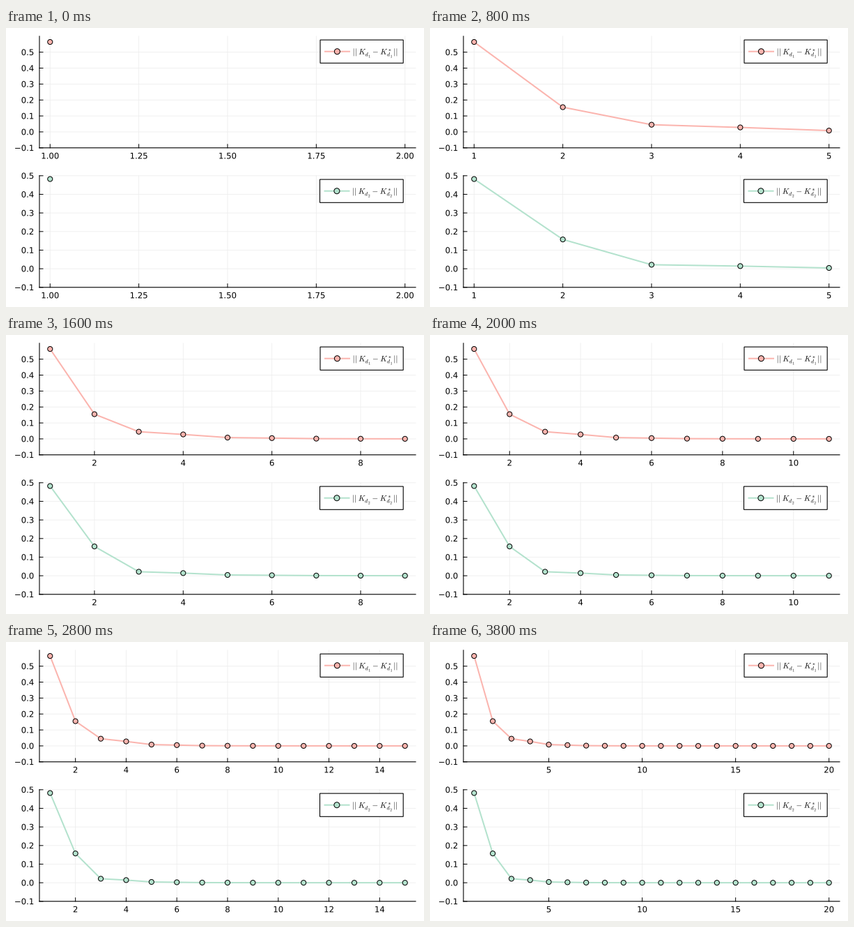
A matplotlib script that plays this animation: 600 by 400 pixels, repeating every 4000 ms.

```python
import numpy as np
import matplotlib.pyplot as plt
from matplotlib.animation import FuncAnimation
from matplotlib.patches import Circle, PathPatch, Rectangle
from matplotlib.textpath import TextPath
from matplotlib.transforms import Affine2D

plt.rcParams["mathtext.fontset"] = "cm"

W, H, DPI = 600, 400, 100
STEPS = 20
PX = 72 / DPI                       # points per pixel
LEFT, RIGHT = 48.0, 588.0
EM, MATH_EM = 11.7, 11.1

DECAY = 0.0016 * 0.5 ** np.arange(STEPS - 6)
PANELS = [
    dict(top=11.8, ymax=0.6, color="#fbb4ae", sub="1", dx=0.0,
         err=np.r_[0.564, 0.155, 0.045, 0.028, 0.0082, 0.005, DECAY]),
    dict(top=211.8, ymax=0.5, color="#b3e2cd", sub="2", dx=-0.5,
         err=np.r_[0.4823, 0.1575, 0.0215, 0.0142, 0.0042, 0.0025, DECAY / 2]),
]
YMIN, PANEL_H = -0.1, 160.0

fig = plt.figure(figsize=(W / DPI, H / DPI), dpi=DPI, facecolor="white")
ax = fig.add_axes([0, 0, 1, 1])


def line(x, y, color="black", width=1.0, z=2, **kw):
    ax.plot(x, y, color=color, lw=width * PX, zorder=z, snap=False, **kw)


def dot(x, y, r, color, z):
    ax.add_patch(Circle((x, y), r, fc=color, ec="black", lw=PX, zorder=z))


def text(x, base, s, size=EM, align=0.0, z=9):
    """Draw s as outlines; align 0 / 0.5 / 1 is left / centre / right."""
    path = TextPath((0, 0), s, size=size, prop={"family": "DejaVu Sans"})
    if align:
        # advance width of digits, point and minus sign
        em = sum({".": 0.318, "\u2212": 0.838}.get(c, 0.636) for c in s)
        x -= align * em * size
    move = Affine2D().scale(1, -1).translate(x, base)
    ax.add_patch(PathPatch(move.transform_path(path), fc="black", lw=0, zorder=z))


def tick_step(n):
    """Spacing of the x ticks when n points are shown."""
    for last, step in ((2, 0.25), (3, 0.5), (7, 1), (11, 2), (14, 2.5),
                       (15, 2), (17, 3), (19, 2.5), (20, 5)):
        if n <= last:
            return step


def x_ticks(n):
    step, hi = tick_step(n), max(n, 2)
    pad = 0.03 * (hi - 1)
    first, last = np.ceil((1 - pad) / step), np.floor((hi + pad) / step)
    digits = 2 if step == 0.25 else 1 if step % 1 else 0
    return [(v, f"{v:.{digits}f}") for v in np.arange(first, last + 1) * step]


def legend(p):
    y, dx = p["top"] + 21.9, p["dx"]
    left = 451.0 + dx
    ax.add_patch(Rectangle((left, y - 16.6), 570.2 - left, 33.2, fc="white",
                           ec="black", lw=1.1 * PX, zorder=6, snap=False))
    line([457 + dx, 494 + dx], [y, y], p["color"], 2, 7, solid_capstyle="butt")
    dot(475.4 + dx, y, 4.0, p["color"], 8)
    base = y + 3.9
    small, tiny = MATH_EM * 0.7, MATH_EM * 0.5
    for x, drop, s, size in (
            (497.6, 0, "|", MATH_EM), (500.7, 0, "|", MATH_EM),
            (506.3, 0, "K", MATH_EM), (515.6, 2.8, "d", small),
            (520.3, 4.8, p["sub"], tiny), (526.0, 0, "-", MATH_EM),
            (537.3, 0, "K", MATH_EM), (549.0, -4.0, "*", small),
            (547.0, 2.8, "d", small), (551.7, 4.8, p["sub"], tiny),
            (556.3, 0, "|", MATH_EM), (559.4, 0, "|", MATH_EM)):
        text(x + dx, base + drop, f"${s}$", size)


def panel(p, n):
    top, bottom = p["top"], p["top"] + PANEL_H
    pad = (RIGHT - LEFT) * 0.03 / 1.06
    unit = (RIGHT - LEFT) / 1.06 / (max(n, 2) - 1)

    def px(v):
        return LEFT + pad + (v - 1) * unit

    def py(v):
        return bottom - (v - YMIN) / (p["ymax"] - YMIN) * PANEL_H

    grid = dict(color="#ededed", width=0.8, z=1)
    for v, label in x_ticks(n):
        x = px(v)
        line([x, x], [top, bottom], **grid)
        line([x, x], [bottom, bottom - 5], z=3)
        text(x, bottom + 15.6, label, align=0.5)
    for i in range(-1, 6):
        y = py(i / 10)
        line([LEFT, RIGHT], [y, y], **grid)
        line([LEFT, LEFT + 5], [y, y], z=3)
        text(40.3, y + 4.3, f"{i / 10:.1f}".replace("-", "\u2212"), align=1)
    line([LEFT, LEFT], [top, bottom], width=1.1, z=3)
    line([LEFT, RIGHT], [bottom, bottom], width=1.1, z=3)

    xs, ys = px(np.arange(1, n + 1)), py(p["err"][:n])
    if n > 1:
        line(xs, ys, p["color"], 2, 4, solid_joinstyle="round",
             solid_capstyle="butt")
    for x, y in zip(xs, ys):
        dot(x, y, 3.55, p["color"], 5)
    legend(p)


def update(k):
    ax.clear()
    ax.set(xlim=(0, W), ylim=(H, 0))
    ax.axis("off")
    for p in PANELS:
        panel(p, k + 1)
    return []


anim = FuncAnimation(fig, update, frames=STEPS, interval=200,
                     init_func=lambda: [], repeat=True, repeat_delay=0)
plt.show()
```
